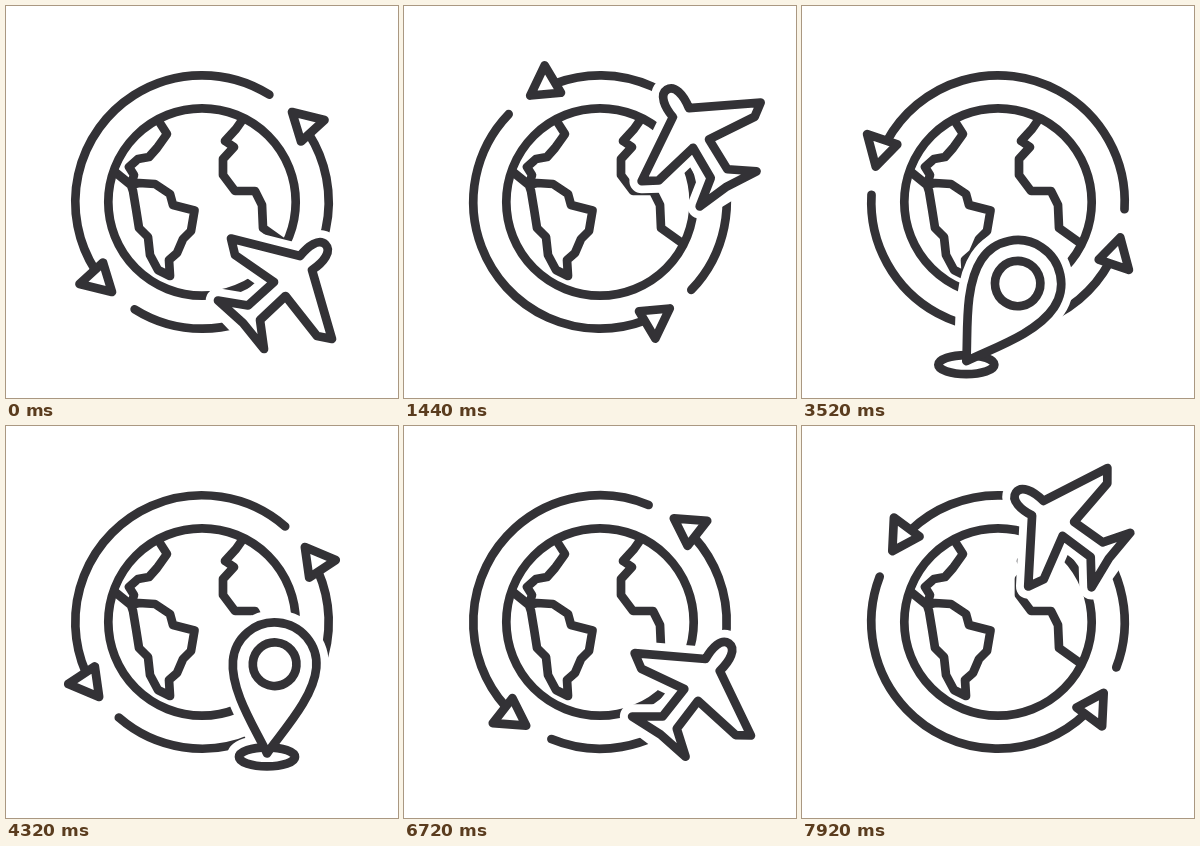
Write an HTML page with a canvas that moves like this. It is 392 px wide and 392 px high and loops after 8000 ms.

```html
<!DOCTYPE html>
<html lang="en">
<head>
<meta charset="utf-8">
<title>Around the world</title>
<style>
html, body { margin: 0; width: 100%; height: 100%; overflow: hidden; background: #fff; }
canvas { display: block; width: 392px; height: 392px; }
</style>
</head>
<body>
<canvas id="stage"></canvas>
<script>
const SIZE = 392, MID = 196, LOOP = 8000, CYCLE = 6250;
const INK = '#333236', LINE = 8.7, HALO = 24.5, RAD = Math.PI / 180;

const canvas = document.getElementById('stage');
const ctx = canvas.getContext('2d');
const dpr = window.devicePixelRatio || 1;
canvas.width = canvas.height = SIZE * dpr;

const LAND = new Path2D(`
  M237 113 L230 123 L219 135 L228 141 L217 153 V169 L229 185 H249 L256 199 L257 222 L278 237
  M152 114 L161 128 L151 142 L143 151 L132 153 L123 161 L128 169 L125 179 L109 166
  M125 179 L133 177 L149 178 L164 188 L167 199 L188.5 204.5 L185 225 L177 233 L171 247 L163 254 L164 270
  L152 264 L144 249 L142 231 L133 222 L130 203 L127 185 Z`);

const ARROW = new Path2D('M286 106 L318.5 114 L295 135.5 Z');

const BODY = `M225 232.5 L294 250 C302 240 313 232 319.5 238.5 C326 245 318 256 306 264
  L326 333 L311 330 L279.5 290 L254 314 L258 343`;
const WING = 'L212 294.5 L242 299.5 L268 276 L229 249 Z';
const PLANE = new Path2D(`${BODY} L237 317 ${WING}`);
const PLANE_HALO = new Path2D(`${BODY} ${WING}`);
const NOSE = [316, 242];

// The tip of the pin is at 0,0.
const PIN = new Path2D(`M0 0 C-12 -21 -38.3 -54 -38.3 -82
  A38.3 38.3 0 0 1 38.3 -82 C38.3 -54 12 -21 0 0 Z`);
const PIN_EYE = new Path2D();
PIN_EYE.arc(0, -82, 20, 0, 7);

const clamp = x => Math.min(1, Math.max(0, x));
const smooth = (t, from, to) => {
  const x = clamp((t - from) / (to - from));
  return x * x * (3 - 2 * x);
};

function stroke(path, width = LINE, color = INK) {
  ctx.lineWidth = width;
  ctx.strokeStyle = color;
  ctx.stroke(path);
}

function outlined(path, width = LINE) {
  ctx.fill(path);
  stroke(path, width);
}

function halo(path, width = HALO) {
  ctx.fill(path);
  stroke(path, width, '#fff');
}

function circle(r, from = 0, to = 360) {
  const path = new Path2D();
  path.arc(MID, MID, r, from * RAD, to * RAD);
  return path;
}

const GLOBE = circle(93.7);
const SWEEP = circle(126.7, -32.6, 122.1);

function turn(degrees) {
  ctx.translate(MID, MID);
  ctx.rotate(degrees * RAD);
  ctx.translate(-MID, -MID);
}

function drawRing(angle) {
  for (const side of [0, 180]) {
    ctx.save();
    turn(side - angle);
    stroke(SWEEP);
    outlined(ARROW);
    ctx.restore();
  }
}

// The plane shrinks towards its nose; its lines keep their weight until it is half size.
function drawPlane(angle, scale) {
  if (scale < 0.01) return;
  const thin = Math.max(scale, 0.5);
  const [x, y] = NOSE;
  ctx.save();
  turn(-angle);
  ctx.translate(x, y);
  ctx.scale(scale, scale);
  ctx.translate(-x, -y);
  halo(PLANE_HALO, HALO / thin);
  outlined(PLANE, LINE / thin);
  ctx.restore();
}

function drawPin(angle, show, stretch) {
  if (show < 0.01) return;
  const rest = (360 - angle) / 60.3;
  const heading = (58 + 42.4 * rest) * RAD;
  const reach = 145 + 20.7 * Math.sin(Math.min(rest, 1) * Math.PI / 2);
  const scale = show * stretch;
  const base = new Path2D();
  base.ellipse(0, 0, 28 * show, 9.5 * show, 0, 0, 7);

  ctx.save();
  ctx.translate(MID + reach * Math.cos(heading), MID + reach * Math.sin(heading));
  const atTip = draw => {
    ctx.save();
    ctx.translate(0, -3.5 * show);
    ctx.rotate(33 * rest * RAD);
    ctx.scale(scale, scale);
    draw();
    ctx.restore();
  };
  halo(base, HALO * show);
  atTip(() => halo(PIN, HALO / stretch));
  outlined(base, LINE * show);
  atTip(() => {
    outlined(PIN, LINE / stretch);
    stroke(PIN_EYE, LINE / stretch);
  });
  ctx.restore();
}

function draw(time) {
  const t = (time % LOOP) % CYCLE;
  const angle = 360 * smooth(t, 8, 4768);
  const planeScale = 1 - smooth(t, 2230, 3080) + smooth(t, 5850, CYCLE);
  const pinShow = smooth(t, 2850, 3420) * (1 - smooth(t, 5690, 6050));
  const pinStretch = 1 + 0.135 * (1 - smooth(t, 3520, 5640));

  ctx.setTransform(dpr, 0, 0, dpr, 0, 0);
  ctx.fillStyle = '#fff';
  ctx.fillRect(0, 0, SIZE, SIZE);
  ctx.lineCap = ctx.lineJoin = 'round';
  stroke(LAND);
  stroke(GLOBE);
  drawRing(angle);
  drawPlane(angle, planeScale);
  drawPin(angle, pinShow, pinStretch);
}

const start = performance.now();
function tick() {
  draw(performance.now() - start);
  requestAnimationFrame(tick);
}
tick();
</script>
</body>
</html>
```
